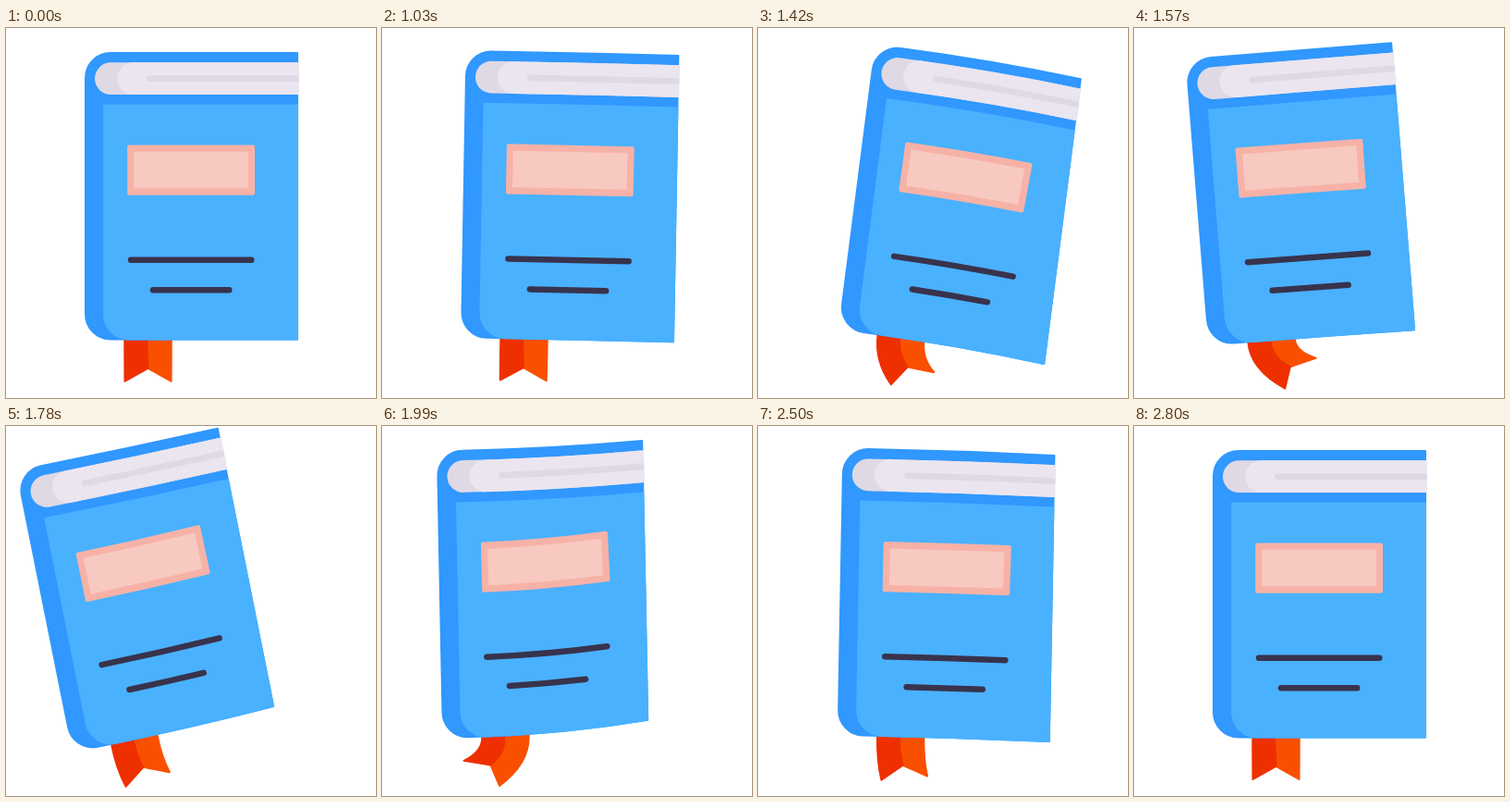
An HTML page with a canvas for the animation above (2830 ms loop, 400 by 400 pixels).

```html
<!DOCTYPE html>
<html lang="en">
<head>
<meta charset="utf-8">
<title>Swinging book</title>
<style>
html, body { margin: 0; width: 100%; height: 100%; overflow: hidden; background: #fff; }
canvas { display: block; width: 100vmin; height: 100vmin; }
</style>
</head>
<body>
<canvas width="400" height="400"></canvas>
<script>
const canvas = document.querySelector('canvas');
const ctx = canvas.getContext('2d');
const LOOP = 2830, START = 1030, STEP = 30;
const HINGE = 105, SPAN = 211, PIVOT = [150, 337];

// time, angle, shift x, shift y, top bend, bottom bend, width change, ribbon swing
const KEYS = [
  [1000, 0, 0, 0, 0, 0, 0, 0],
  [1030, 1, 0, -1, 1, 1, 0, 0],
  [1210, 14.4, 5, -6, 14.3, 14.6, -3, .12],
  [1260, 15.1, 5.5, -6, 14.3, 14.6, -3, .2],
  [1540, -2.2, -4, .5, 1.5, 3, -6.2, .95],
  [1570, -4.6, -5, 1, 0, 1.5, -6.5, 1],
  [1760, -11.5, -14, 3, -2, -5, -7, .3],
  [1990, -1.13, -20, -1, -7.5, -16, -7.5, -.93],
  [2080, 2, -11, -2, -3, -6, -6, -.6],
  [2160, 3.2, -3, -3, 3, 2, -4.5, 0],
  [2260, 2.9, 1.5, -3, 7.5, 6.5, -3, .4],
  [2700, 0, 0, 0, 0, 0, 0, 0]
];

const rate = (i, c) => KEYS[i + 1] && KEYS[i]
  ? (KEYS[i + 1][c] - KEYS[i][c]) / (KEYS[i + 1][0] - KEYS[i][0]) : 0;

// Monotone tangent: flat at every turning point
function tangent(i, c) {
  const a = rate(i - 1, c), b = rate(i, c);
  return a * b > 0 ? 2 * a * b / (a + b) : 0;
}

function poseAt(t) {
  const i = KEYS.findLastIndex(k => k[0] <= t);
  if (i < 0 || i === KEYS.length - 1) return KEYS[0].slice(1);
  const from = KEYS[i], to = KEYS[i + 1], h = to[0] - from[0], s = (t - from[0]) / h;
  return from.slice(1).map((v, n) => {
    const c = n + 1, ease = s * s * (3 - 2 * s);
    return v + (to[c] - v) * ease
      + h * s * (1 - s) * ((1 - s) * tangent(i, c) - s * tangent(i + 1, c));
  });
}

function shape(color, build, outline = 0) {
  ctx.beginPath();
  build();
  ctx.closePath();
  ctx.fillStyle = ctx.strokeStyle = color;
  ctx.fill();
  if (outline) {
    ctx.lineWidth = outline;
    ctx.stroke();
  }
}

// Bent horizontal edge: a parabola starting at the hinge
function edge(x0, x1, y, k) {
  const u0 = x0 - HINGE, u1 = x1 - HINGE;
  ctx.lineTo(x0, y + k * u0 * u0);
  ctx.quadraticCurveTo((x0 + x1) / 2, y + k * u0 * u1, x1, y + k * u1 * u1);
}

function ribbon(b) {
  const q = 7 * b * b;
  const notch = [153.5 + 18 * b, 368 - b * b];
  const left = [128.5 + 28.5 * b + q, 382 + 15 * b - q];
  const right = [178.5 + 28.5 * b - q, 382 - 15 * b - q];
  const half = (color, x, tip, seam) => shape(color, () => {
    ctx.moveTo(x, 328);
    ctx.lineTo(x, 337);
    ctx.quadraticCurveTo(x, (337 + tip[1]) / 2 + 3, ...tip);
    ctx.lineTo(...notch);
    ctx.quadraticCurveTo(seam, 356, seam, 337);
    ctx.lineTo(seam, 328);
  }, 2);
  half('#f95000', 178.7, right, 154.5);
  half('#ee3000', 128.3, left, 152.8);
}

function pages(color, x, y, r, right, k) {
  shape(color, () => {
    ctx.arc(x + r, y + r, r, Math.PI / 2, Math.PI * 1.5);
    edge(Math.max(HINGE, x + r), right, y, k);
    edge(right, Math.max(HINGE, x + r), y + 2 * r, k);
  });
}

function label(color, x0, x1, y0, y1, k) {
  const tilt = 2 * k * (k > 0 ? .8 : .25);
  const lean = (x, y) => x - (y - 153.5) * tilt * (x - HINGE);
  const lift = (a, b) => k * (a - HINGE) * (b - HINGE);
  const mid = (x0 + x1) / 2;
  shape(color, () => {
    ctx.moveTo(lean(x0, y0), y0 + lift(x0, x0));
    ctx.quadraticCurveTo(lean(mid, y0), y0 + lift(x0, x1), lean(x1, y0), y0 + lift(x1, x1));
    ctx.lineTo(lean(x1, y1), y1 + lift(x1, x1));
    ctx.quadraticCurveTo(lean(mid, y1), y1 + lift(x0, x1), lean(x0, y1), y1 + lift(x0, x0));
  }, color === '#f7b2a7' ? 4 : 0);
}

function rule(x0, x1, y, k) {
  ctx.beginPath();
  edge(x0, x1, y, k);
  ctx.strokeStyle = '#38334c';
  ctx.lineWidth = 6.5;
  ctx.stroke();
}

function draw(t) {
  const [angle, dx, dy, topBend, bottomBend, grow, swing] = poseAt(t);
  const kTop = topBend / SPAN ** 2, k = bottomBend / SPAN ** 2;
  const right = 315 + grow;

  ctx.setTransform(1, 0, 0, 1, 0, 0);
  ctx.fillStyle = '#fff';
  ctx.fillRect(0, 0, 400, 400);
  ctx.lineJoin = ctx.lineCap = 'round';
  ctx.translate(PIVOT[0] + dx, PIVOT[1] + dy);
  ctx.rotate(angle * Math.PI / 180);
  ctx.translate(-PIVOT[0], -PIVOT[1]);

  ribbon(swing);
  shape('#3098fe', () => {
    ctx.arc(113, 54, 27, Math.PI, Math.PI * 1.5);
    edge(113, right, 27, kTop);
    edge(right, 113, 336.5, k);
    ctx.arc(113, 309.5, 27, Math.PI / 2, Math.PI);
  }, 2);
  shape('#4ab1ff', () => {
    edge(106, right, 83.5, kTop);
    edge(right, 133, 336.5, k);
    ctx.quadraticCurveTo(122, 336.5, 114, 328.5);
    ctx.quadraticCurveTo(106, 320.5, 106, 309);
  }, 2);

  const pageEnd = right + 1.5;
  pages('#dfd9e5', 96, 37.3, 17.4, pageEnd, kTop);
  pages('#ebe5f0', 120, 37.3, 17.4, pageEnd, kTop);
  pages('#dfd9e5', 152, 51.2, 3.4, pageEnd, kTop);

  label('#f7b2a7', 133.2, 267, 128.5, 178.7, k);
  label('#f8c9c1', 138.3, 261.7, 133.8, 173.3, k);
  rule(135, 265.2, 250.7, k);
  rule(159, 241.2, 283.2, k);
}

function tick(now) {
  const t = now % LOOP;
  draw(t < START ? 0 : START + Math.floor((t - START) / STEP) * STEP);
  requestAnimationFrame(tick);
}
tick(0);
</script>
</body>
</html>
```
